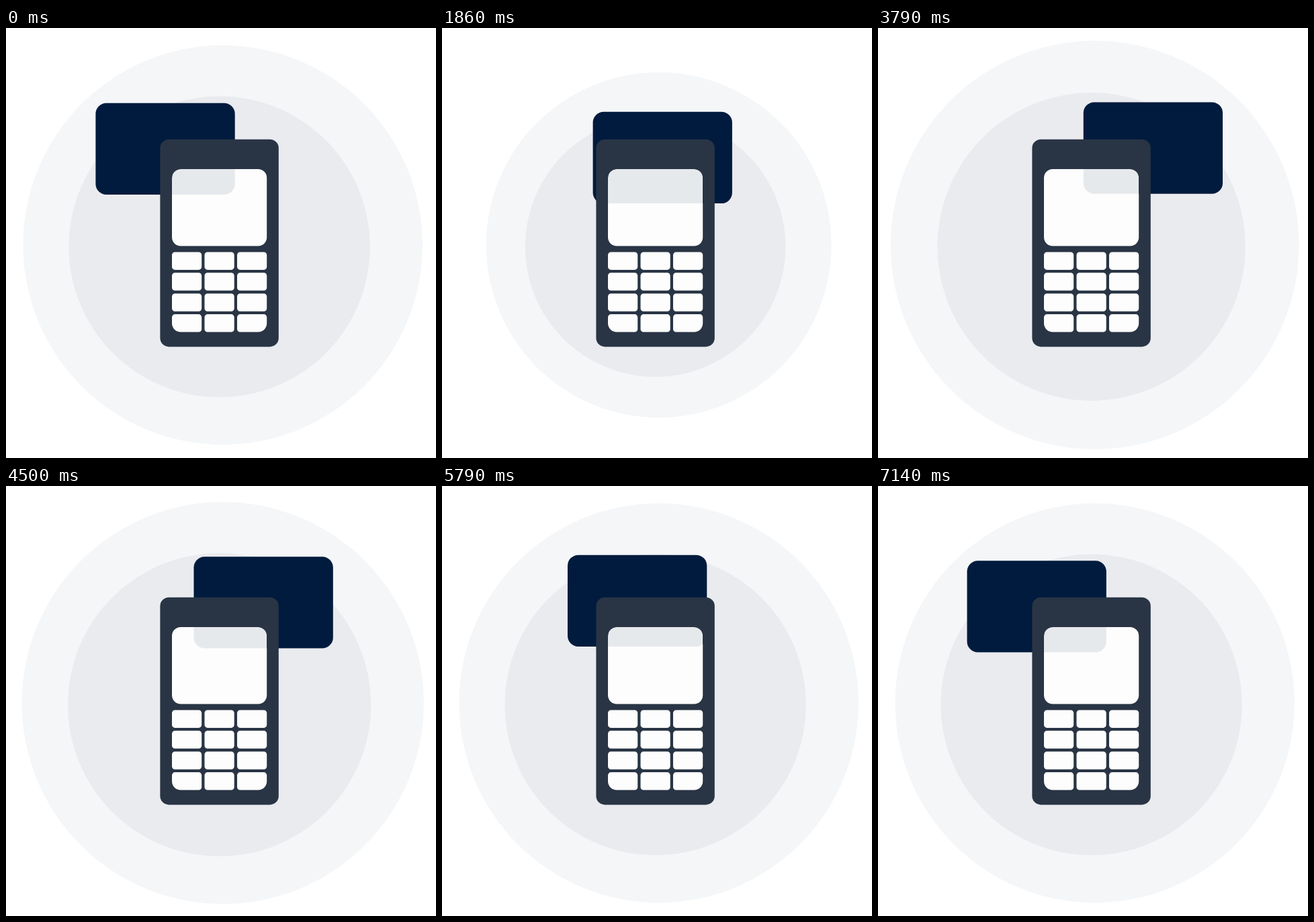
Animation, 640 px wide and 640 px high, one loop 7210 ms. Source, as an HTML page with a canvas:

```html
<!DOCTYPE html>
<html lang="en">
<head>
<meta charset="utf-8">
<title>Card and terminal</title>
<style>
  html, body { margin: 0; width: 100%; height: 100%; overflow: hidden; background: #fff; }
  canvas { display: block; width: 100vw; height: 100vh; }
</style>
</head>
<body>
<canvas id="stage" width="640" height="640"></canvas>
<script>
const ctx = document.getElementById('stage').getContext('2d');
const LOOP = 7210, STEP = 500 / 7;

// Key points of the card's closed orbit
const orbit = [
  { t: 0, x: 133.4, y: 111.8 },
  { t: 1070, x: 169, y: 123.1 },
  { t: 1570, x: 203.8, y: 125.8 },
  { t: 2570, x: 272, y: 118.3 },
  { t: 3790, x: 305.7, y: 110.4 },
  { t: 4500, x: 279.5, y: 105.2 },
  { t: 5790, x: 186.7, y: 102.7 },
  { t: 6800, x: 131.5, y: 109.3 }
];

// Point i of the orbit, with times continuing past either end of the loop
function orbitPoint(i) {
  const n = orbit.length, lap = Math.floor(i / n);
  const point = orbit[i - lap * n];
  return { ...point, t: point.t + lap * LOOP };
}

function velocity(i, axis) {
  const [a, b, c] = [i - 1, i, i + 1].map(orbitPoint);
  const before = b.t - a.t, after = c.t - b.t;
  return ((b[axis] - a[axis]) / before * after + (c[axis] - b[axis]) / after * before) / (before + after);
}

// Smooth curve through the key points
function cardAt(t, axis) {
  const i = orbit.findLastIndex(point => point.t <= t);
  const a = orbitPoint(i), b = orbitPoint(i + 1);
  const span = b.t - a.t, u = (t - a.t) / span, v = 1 - u;
  return a[axis] * v * v * (1 + 2 * u) + b[axis] * u * u * (3 - 2 * u)
    + span * u * v * (velocity(i, axis) * v - velocity(i + 1, axis) * u);
}

function ease(from, to, start, end, t) {
  const u = Math.min(1, Math.max(0, (t - start) / (end - start)));
  return from + (to - from) * (1 - Math.cos(Math.PI * u)) / 2;
}

// The discs shrink, swell a little past full size, then settle
function pulseAt(t) {
  if (t < 1800) return ease(1, 0.864, 0, 1800, t);
  if (t < 3600) return ease(0.864, 1.0235, 1800, 3600, t);
  return ease(1.0235, 1, 3600, 5000, t);
}

function roundedBox(x, y, w, h, r) {
  const path = new Path2D();
  path.roundRect(x, y, w, h, r);
  return path;
}

function fill(path, color, rule = 'nonzero') {
  ctx.fillStyle = color;
  ctx.fill(path, rule);
}

function disc(x, y, r, color) {
  const path = new Path2D();
  path.arc(x, y, r, 0, Math.PI * 2);
  fill(path, color);
}

const screen = roundedBox(247, 210, 141.2, 114.6, 13);
const body = roundedBox(229.4, 165.8, 176.4, 308.6, 13);
body.addPath(screen);

const keys = new Path2D();
for (let row = 0; row < 4; row++) {
  for (let col = 0; col < 3; col++) {
    const corner = side => row === 3 && col === side ? 13 : 4.4;
    keys.addPath(roundedBox(247 + col * 48.5, 333.4 + row * 30.9, 44.2, 26.5, [4.4, 4.4, corner(2), corner(0)]));
  }
}

function draw(t) {
  const scale = pulseAt(t);
  ctx.clearRect(0, 0, 640, 640);
  disc(322.7, 323, 297.2 * scale, '#f4f6f8');
  disc(317.6, 325.5, 224.1 * scale, '#eaebef');
  fill(roundedBox(cardAt(t, 'x'), cardAt(t, 'y'), 207.3, 136.2, 16), '#001b3d');
  fill(screen, 'rgba(255, 255, 255, 0.9)');
  fill(body, '#293545', 'evenodd');
  fill(keys, '#fdfdfd');
}

const start = performance.now();
function tick() {
  const t = (performance.now() - start) % LOOP;
  draw(Math.min(100, Math.floor((t + 6) / STEP)) * STEP);
  requestAnimationFrame(tick);
}
tick();
</script>
</body>
</html>
```
